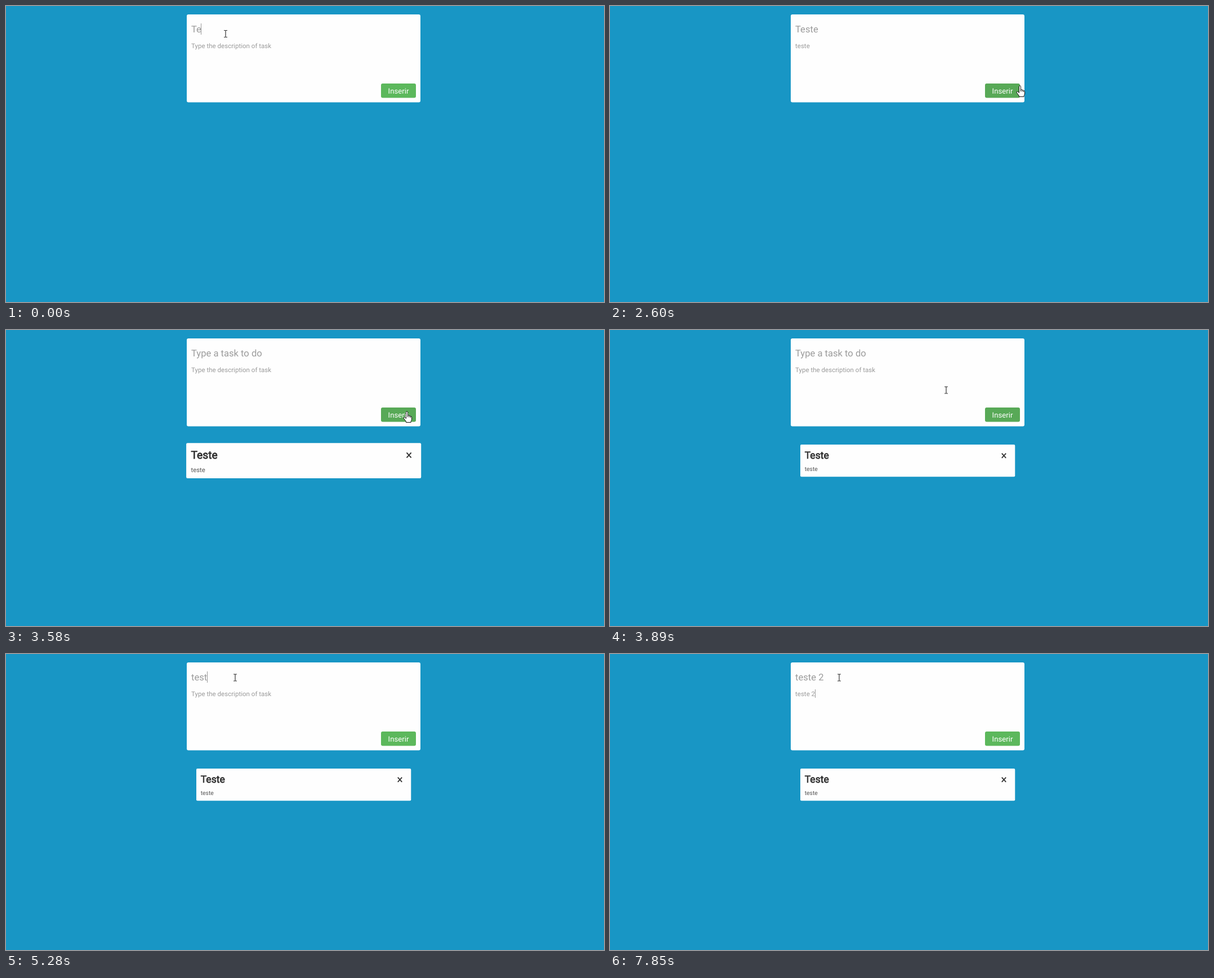
Write an HTML page that moves like this. It is 1062 px wide and 527 px high and loops after 8 s.

```html
<!DOCTYPE html>
<html lang="en">
<head>
<meta charset="utf-8">
<title>Task list</title>
<style>
  html, body { margin: 0; width: 100%; height: 100%; overflow: hidden; background: #1896c5; }
  svg { display: block; width: 1062px; height: 527px; }
  text { font-family: Roboto, Arial, sans-serif; white-space: pre; text-rendering: geometricPrecision; }
  .field { fill: #9b9b9b; }
  #title { font-size: 16.6px; }
  #note { font-size: 11.55px; }
  #caret { fill: #999; shape-rendering: crispEdges; }
</style>
</head>
<body>
<svg viewBox="0 0 1062 527">
  <rect x="321" y="15" width="415" height="156.5" rx="3" fill="#fefefe"/>
  <text id="title" class="field" x="329" y="47"></text>
  <text id="note" class="field" x="329" y="74.5"></text>
  <rect id="caret" width="1"/>
  <rect id="button" x="666" y="138" width="62" height="25.6" rx="3"/>
  <text x="697" y="155.7" font-size="13.2" fill="#fff" text-anchor="middle">Inserir</text>

  <g id="task">
    <rect x="338" y="204" width="381.3" height="57.2" rx="2" fill="#fefefe"/>
    <text x="345.7" y="229" font-size="17.6" fill="#2d2d2d" stroke="#2d2d2d" stroke-width=".7">Teste</text>
    <text x="345.7" y="251" font-size="10.4" fill="#555">teste</text>
    <path d="M695.8 219.6l7.4 8.2m0-8.2l-7.4 8.2" stroke="#333" stroke-width="1.8"/>
  </g>

  <path id="beam" d="M-3-6h2.2L0-5.4.8-6H3M0-5.4V5.4M-3 6h2.2L0 5.4.8 6H3" fill="none" stroke="#333" stroke-width="1.2"/>
  <g id="hand" stroke="#111" stroke-width="1" stroke-linejoin="round">
    <path fill="#fff" d="M-1.5 12V1.5a1.5 1.5 0 0 1 3 0V7q2.4-1.2 2.6.8q2.2-.8 2.4 1q2-.4 2 1.6V14q0 2-1.4 3.5v2h-8.6V18l-4-5.5q-1-2 .8-2.2q1 0 3.2 2.2z"/>
    <path fill="none" d="M1.5 7v3M4.1 8v2.5M6.5 9v2"/>
  </g>
</svg>
<script>
const LOOP = 8000, SUBMIT = 3430;
const $ = id => document.getElementById(id);

// Each entry: start time, then the values that hold until the next entry.
const pointer = [
  [0, 390, 49.5], [2300, 430, 62], [2450, 610, 112],
  [2600, 728, 142, true], [2750, 722, 152, true], [2870, 715, 147, true], [2990, 712, 145, true],
  [3730, 675, 132], [3890, 597, 107], [4010, 510, 74], [4160, 435, 49], [4300, 407, 42]
];
const pop = [[0, 0], [SUBMIT, .491], [3580, 1.094], [3730, 1.02], [3890, 1]];
const focus = [[0, 'title'], [670, 'note'], [2600, ''], [4550, 'title'], [6380, ''], [6630, 'note']];

const fields = {
  title: {
    hint: 'Type a task to do', top: 31, height: 20,
    first: ['Teste', [0, 0, 150, 320, 500]],
    second: ['teste 2', [4920, 5040, 5160, 5280, 5430, 5630, 5830]]
  },
  note: {
    hint: 'Type the description of task', top: 63, height: 15,
    first: ['teste', [1100, 1250, 1450, 1650, 2020]],
    second: ['teste 2', [7030, 7160, 7290, 7420, 7560, 7700, 7850]]
  }
};

const at = (steps, t) => steps.findLast(step => step[0] <= t).slice(1);

function typed(field, t) {
  const [text, keys] = t < SUBMIT ? field.first : field.second;
  return text.slice(0, keys.filter(key => key <= t).length);
}

function drawFields(t) {
  const [active] = at(focus, t);
  $('caret').style.display = active ? '' : 'none';
  for (const id in fields) {
    const field = fields[id], value = typed(field, t);
    $(id).textContent = value || field.hint;
    if (id === active) {
      const width = value ? $(id).getComputedTextLength() : 0;
      $('caret').setAttribute('x', 329 + Math.floor(width));
      $('caret').setAttribute('y', field.top);
      $('caret').setAttribute('height', field.height);
    }
  }
}

function drawPointer(t) {
  const [x, y, isHand] = at(pointer, t);
  $('hand').style.display = isHand ? '' : 'none';
  $('beam').style.display = isHand ? 'none' : '';
  $(isHand ? 'hand' : 'beam').setAttribute('transform', `translate(${x} ${y})`);
}

function draw(t) {
  drawFields(t);
  drawPointer(t);
  $('button').setAttribute('fill', t >= 2600 && t < 4430 ? '#58a957' : '#5cb85c');
  $('task').setAttribute('transform',
    `translate(528.6 232.5) scale(${at(pop, t)[0]}) translate(-528.6 -232.5)`);
}

const start = performance.now();
function tick() {
  draw((performance.now() - start) % LOOP);
  requestAnimationFrame(tick);
}
tick();
</script>
</body>
</html>
```
